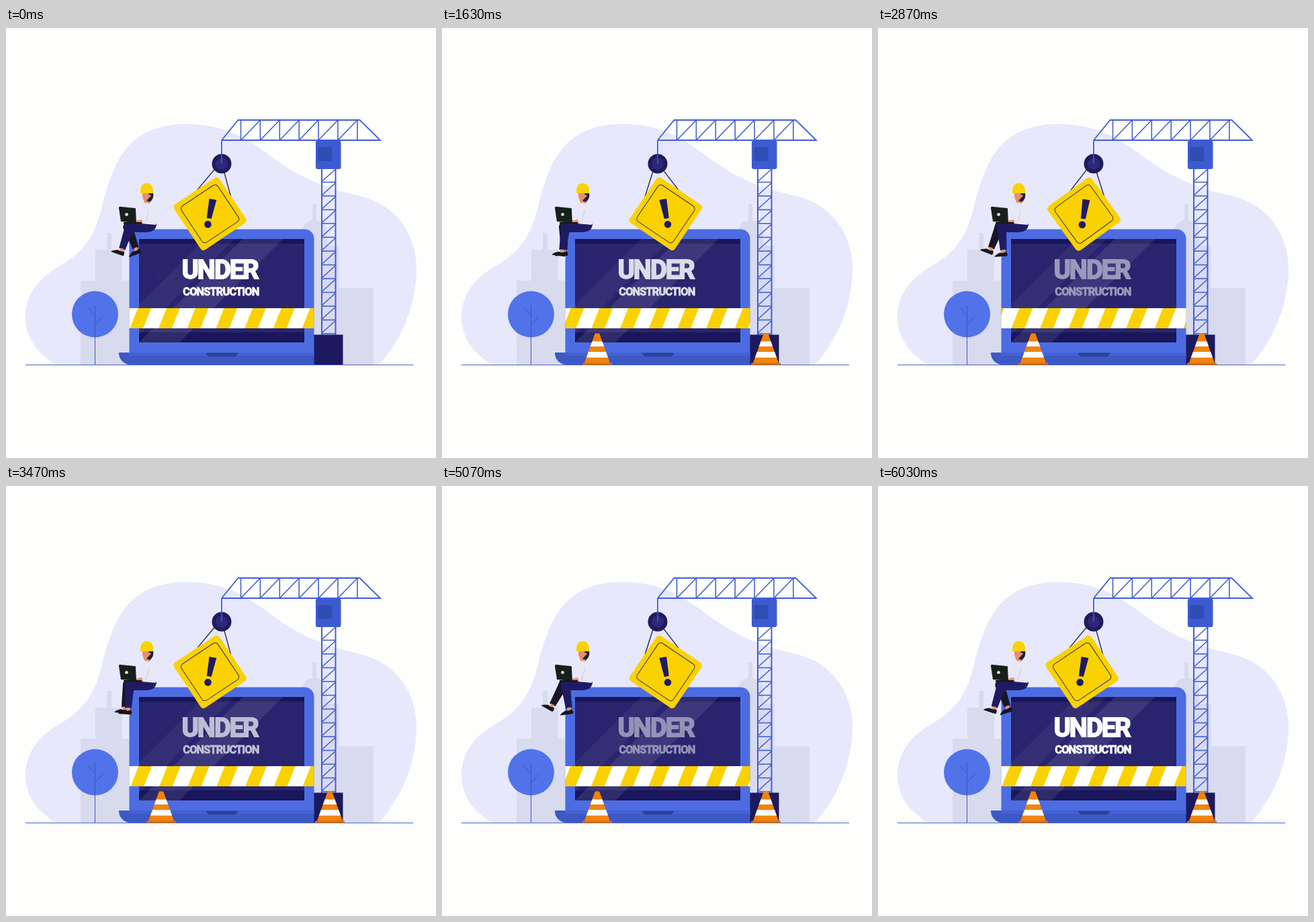
Write an HTML page with a canvas that moves like this. It is 640 px wide and 640 px high and loops after 6060 ms.

```html
<!DOCTYPE html>
<html lang="en">
<head>
<meta charset="utf-8">
<title>Under construction</title>
<style>
html, body { margin: 0; width: 100%; height: 100%; overflow: hidden; background: #fefefd; }
canvas { display: block; width: 100vmin; height: 100vmin; }
</style>
</head>
<body>
<canvas id="stage" width="640" height="640"></canvas>
<script>
const ctx = document.getElementById('stage').getContext('2d');
const LOOP = 6060, RAD = Math.PI / 180;
const NAVY = '#1f1b62', BLUE = '#425fd0', YELLOW = '#fad202', ORANGE = '#f1830c';
const SCREEN = [41, 36, 110];

function rect(x, y, w, h, color, r = 0) {
  ctx.fillStyle = color;
  ctx.beginPath();
  ctx.roundRect(x, y, w, h, r);
  ctx.fill();
}

function poly(color, ...pts) {
  ctx.fillStyle = color;
  ctx.beginPath();
  for (let i = 0; i < pts.length; i += 2) ctx.lineTo(pts[i], pts[i + 1]);
  ctx.closePath();
  ctx.fill();
}

function line(color, width, ...pts) {
  ctx.strokeStyle = color;
  ctx.lineWidth = width;
  ctx.beginPath();
  for (let i = 0; i < pts.length; i += 2) ctx.lineTo(pts[i], pts[i + 1]);
  ctx.stroke();
}

function disc(x, y, r, color) {
  ctx.fillStyle = color;
  ctx.beginPath();
  ctx.arc(x, y, r, 0, 7);
  ctx.fill();
}

function shape(d, color) {
  ctx.fillStyle = color;
  ctx.fill(new Path2D(d));
}

function at(x, y, deg, draw) {
  ctx.save();
  ctx.translate(x, y);
  ctx.rotate(deg * RAD);
  draw();
  ctx.restore();
}

const clamp = v => Math.max(0, Math.min(1, v));
const ease = v => (1 - Math.cos(Math.PI * clamp(v))) / 2;

// Eased value from [time, value] keys.
function track(keys, t) {
  for (let i = 1; i < keys.length; i++) {
    const [t0, a] = keys[i - 1], [t1, b] = keys[i];
    if (t < t1) return a + (b - a) * ease((t - t0) / (t1 - t0));
  }
  return keys[keys.length - 1][1];
}

function backdrop() {
  rect(0, 0, 640, 640, '#fefefd');
  shape('M75 501C48 486 29 462 29 430C29 396 50 371 80 354C122 330 133 303 143 266' +
    'C158 208 176 143 268 143C336 143 367 172 407 200C459 236 500 243 530 251' +
    'C580 263 611 308 611 358C611 411 589 464 555 501Z', '#e7e8fb');
  const wall = '#d8daee';
  rect(150, 305, 7, 30, wall);
  rect(133, 330, 40, 60, wall);
  rect(111, 376, 74, 125, wall);
  rect(456, 262, 6, 35, wall);
  disc(459, 305, 19, wall);
  rect(440, 305, 38, 196, wall);
  rect(470, 324, 25, 177, wall);
  rect(495, 387, 52, 114, wall);
}

function tree() {
  disc(132.5, 426, 34.5, '#5272ea');
  line('#3b56bf', 1, 132.5, 413, 132.5, 501);
  line('#3b56bf', 1, 122, 416, 132.5, 428);
  line('#3b56bf', 1, 144, 429, 132.5, 442);
}

function crane() {
  const step = 20.5;
  line(BLUE, 2, 470, 209, 470, 457);
  line(BLUE, 2, 490.5, 209, 490.5, 457);
  for (let i = 0; i < 12; i++) {
    const y = 209 + i * step;
    line(BLUE, 1.6, 470, y + step, 490.5, y + step);
    line(BLUE, 1.6, 470, y + step - 1, 490.5, y + 1);
  }
  rect(458, 456.5, 43.5, 44.5, '#1d195f');

  for (let i = 0; i < 7; i++) {
    const x = 349.5 + i * 28.9;
    line(BLUE, 1.6, x, 137, x, 167);
    if (i < 6) line(BLUE, 1.6, x, 167, x + 28.9, 137);
  }
  line(BLUE, 1.8, 321, 167, 345.5, 137, 526.5, 137, 557, 167, 321, 167);
  rect(461, 167.5, 37.5, 42.5, '#3d5bd0', 3);
  rect(464, 177, 21, 21, '#304db4', 2);
}

function screen() {
  const x0 = 198, y0 = 314, w = 246, h = 154;
  ctx.save();
  ctx.beginPath();
  ctx.rect(x0, y0, w, h);
  ctx.clip();
  rect(x0, y0, w, h, '#19165a');
  rect(x0, 321, w, 132, `rgb(${SCREEN})`);
  const band = (left, width, alpha) =>
    poly(`rgba(255,255,255,${alpha})`, left, y0, left + width, y0, left + width - h, y0 + h, left - h, y0 + h);
  band(296, 44, 0.05);
  band(352, 60, 0.09);
  ctx.restore();
}

// Tight bold caption, as large as the width allows.
function caption(text, width, size, middle, heft, color) {
  const setFont = px => {
    ctx.font = `700 ${px}px Impact, Roboto, "Liberation Sans", sans-serif`;
    ctx.letterSpacing = -0.05 * px + 'px';
  };
  setFont(100);
  setFont(Math.min(size, (width - heft) / ctx.measureText(text).width * 100));
  const box = ctx.measureText(text);
  const left = 320 - (box.actualBoundingBoxRight - box.actualBoundingBoxLeft) / 2;
  const base = middle + box.actualBoundingBoxAscent / 2;
  ctx.textAlign = 'left';
  ctx.fillStyle = ctx.strokeStyle = color;
  ctx.lineWidth = heft;
  ctx.lineJoin = 'miter';
  ctx.strokeText(text, left, base);
  ctx.fillText(text, left, base);
}

function tape(t) {
  const pitch = 42.7, white = 23, slant = 12, top = 417, bottom = 447;
  ctx.save();
  ctx.beginPath();
  ctx.rect(183.5, top, 275, bottom - top);
  ctx.clip();
  rect(183, top, 277, 30, YELLOW);
  const shift = t / 862 * pitch % pitch;
  for (let x = 204 - 2 * pitch + shift; x < 470; x += pitch)
    poly('#fffffd', x, bottom, x + slant, top, x + slant + white, top, x + white, bottom);
  ctx.restore();
}

function laptop(t) {
  rect(183.5, 299.5, 275, 190, '#4d6ce2', [14, 14, 0, 0]);
  screen();
  const glow = 0.75 + 0.25 * Math.cos(t / 2020 * 2 * Math.PI);
  const color = `rgb(${SCREEN.map(c => c + (255 - c) * glow)})`;
  caption('UNDER', 115, 46, 358.5, 1.8, color);
  caption('CONSTRUCTION', 114, 20, 391.5, 0.8, color);
  tape(t);
  rect(168, 483, 290.5, 18, '#3c59c4', [0, 0, 0, 17]);
  rect(183, 483, 275.5, 5, '#4361d2');
  poly('#2b429c', 297, 483.5, 346, 483.5, 342, 489, 301, 489);
}

function leg(x, y, dx, color) {
  at(x, y, -Math.asin(dx / 38) / RAD, () => {
    disc(0, 1, 7, color);
    poly(color, -7, 0, 7, 0, 5, 35, -4.5, 35);
    rect(-2.5, 34, 5.5, 5, '#e6906c');
    shape('M4 37Q7 41 5 44L-14 44Q-13 41 -5 38Q0 40 4 37Z', '#17151b');
  });
}

function man(t) {
  // Legs swap places at constant speed.
  const s = 4 * Math.abs(t / 2020 % 1 - 0.5) - 1;
  leg(181, 295, -3 + 16 * s, '#191727');
  leg(184, 296, -3.5 - 9 * s, NAVY);
  shape('M178 289Q200 292 224 291Q224 303 210 304L184 304Q176 300 178 289Z', NAVY);

  shape('M204 261Q214 255 222 259Q228 262 226 277L223 293L201 291Z', '#e8e7f6');
  line('#cfcfe6', 1, 213, 270, 208, 289);
  shape('M203 243L218 243L217 256L214 261L206 260L203 251Z', '#e6906c');
  shape('M212 244L219 245Q221 254 214 259L209 257L213 253Z', '#231f3a');
  disc(213.5, 250, 2, '#e6906c');
  shape('M200 246Q199 231 210 231Q220 232 219 246Z', '#fad202');

  shape('M193 287L202 285L204 291L194 291Z', '#e6906c');
  shape('M168 268Q168 265 171 266L191 268Q194 268 193 271L194 290L171 288Z', '#16201a');
  rect(175, 289, 27, 2.5, '#16181c');
  disc(179.5, 277.5, 2.3, '#f2f2ec');
}

function sign(t) {
  const swing = track([[0, 11.3], [500, 11.3], [1500, -11], [2240, -11], [3030, 11.3]], t % 3030);
  at(318.5, 202, swing, () => {
    line('#26235c', 1.4, -1, 0, -25.5, 45);
    line('#26235c', 1.4, 3, 0, 25.5, 45);
  });
  line(BLUE, 1.8, 321, 167, 321, 202);
  disc(321, 202, 14.5, '#1f1b5e');
  disc(321, 202, 9, '#2c2978');
  line(BLUE, 1.4, 321, 188, 321, 202);
  at(318.5, 202, swing, () => {
    ctx.translate(0, 76);
    at(0, 0, 45, () => {
      rect(-40.5, -40.5, 81, 81, YELLOW, 5);
      ctx.strokeStyle = '#3b3540';
      ctx.lineWidth = 1;
      ctx.beginPath();
      ctx.roundRect(-32.5, -32.5, 65, 65, 5);
      ctx.stroke();
    });
    poly(NAVY, -5.5, -22, 5.5, -22, 3.5, 7, -3.5, 7);
    disc(0, 16, 5.3, NAVY);
  });
}

function cone(x, t) {
  const p = t / 700;
  if (p <= 0) return;
  const dy = track([[0, -120], [0.47, -20], [0.65, 4], [0.82, 0]], p);
  const tilt = track([[0, -40], [0.47, -11], [0.65, 16], [0.82, -7], [1, 0]], p);
  ctx.save();
  ctx.globalAlpha = clamp(p * 5);
  at(x, 478 + dy, tilt, () => {
    const half = y => 3 + (y + 24) * 0.36;
    const ring = (a, b, color) => poly(color, -half(a), a, half(a), a, half(b), b, -half(b), b);
    ring(-23.5, 22, ORANGE);
    ring(-11.5, -4, '#fffdfa');
    ring(4, 12.5, '#fffdfa');
    rect(-22, 20.5, 44, 3, '#d96f08', 1);
  });
  ctx.restore();
}

function draw(t) {
  backdrop();
  tree();
  crane();
  laptop(t);
  line('#4a66cf', 1.2, 29, 501.5, 606, 501.5);
  man(t);
  sign(t);
  cone(231, t);
  cone(482, t - 400);
}

const start = performance.now();
function tick() {
  draw((performance.now() - start) % LOOP);
  requestAnimationFrame(tick);
}
tick();
</script>
</body>
</html>
```
